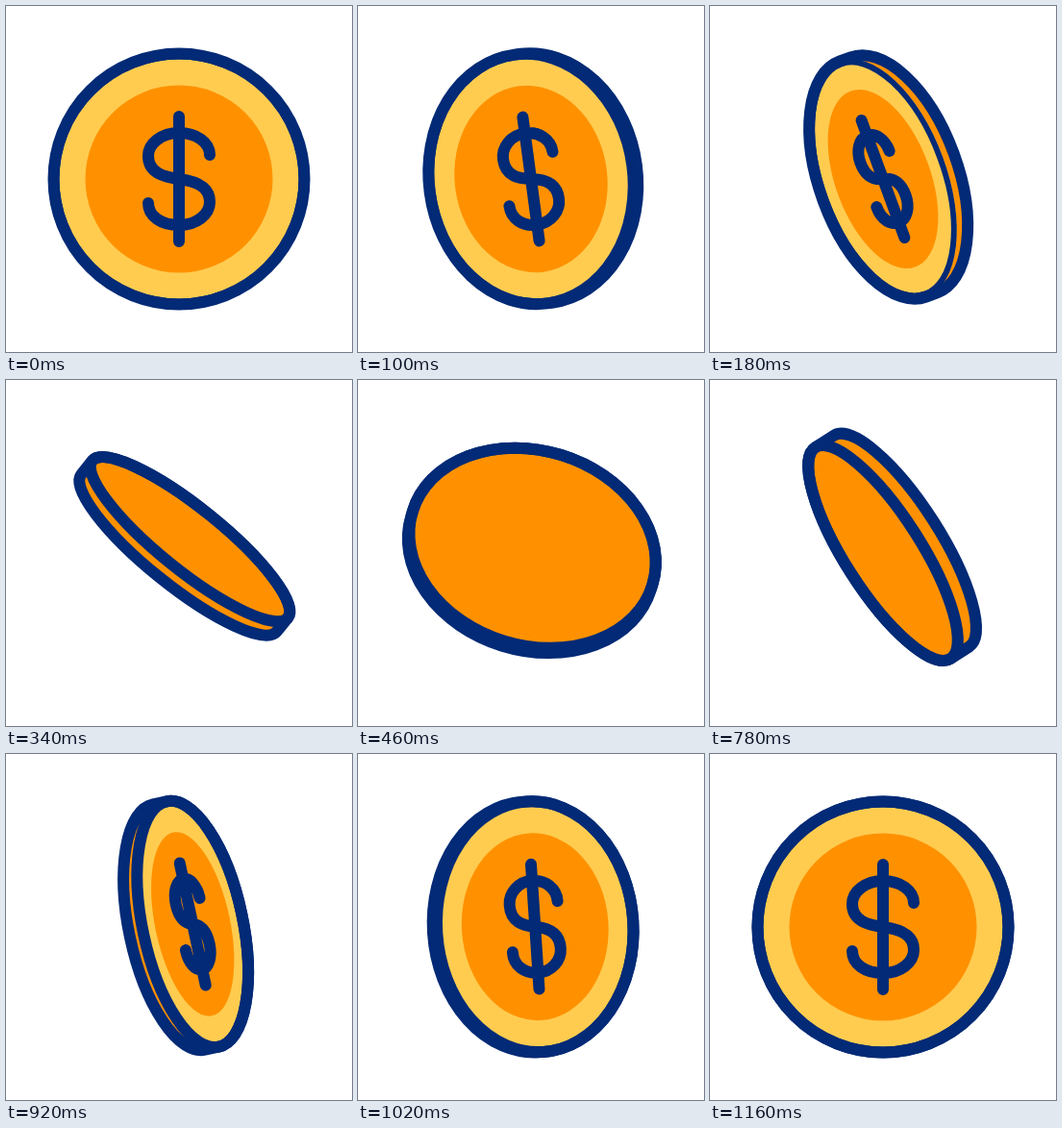
Recreate the animation shown at these times as an HTML page with a canvas. Size 360 by 360 pixels, loop 1.4 s.

```html
<!DOCTYPE html>
<html lang="en">
<head>
<meta charset="utf-8">
<title>Flipping coin</title>
<style>
  html, body { margin: 0; width: 100%; height: 100%; overflow: hidden; background: #fff; }
  canvas { display: block; width: 360px; height: 360px; }
</style>
</head>
<body>
<canvas id="stage" width="360" height="360"></canvas>
<script>
const ctx = document.getElementById('stage').getContext('2d');
const LOOP = 1400, STEP = 20, FLIP = 560, END = 1160;
const RADIUS = 130.5, DISC = 97.5, LINE = 12;
const NAVY = '#022a76', ORANGE = '#ff9100', YELLOW = '#ffcc50';

// Ease with flat ends: a Bezier curve through (x1, 0) and (x2, 1).
function ease(x, x1, x2) {
  let lo = 0, hi = 1;
  for (let i = 0; i < 24; i++) {
    const p = (lo + hi) / 2, q = 1 - p;
    if (3 * x1 * p * q * q + 3 * x2 * p * p * q + p * p * p < x) lo = p;
    else hi = p;
  }
  return lo * lo * (3 - 2 * lo);
}

// facing: 1 = front to the viewer, 0 = edge-on, -1 = back to the viewer
// depth: thickness of the edge when seen edge-on
function poseAt(time) {
  if (time < FLIP) {
    const e = ease(time / FLIP, 0.287, 0.755);
    return { facing: 1 - 2 * e, tilt: 82 * e, depth: 24.5, firstHalf: true };
  }
  const x = Math.min(1, (time - FLIP) / (END - FLIP));
  const e = ease(x, 0.305, 0.6);
  return {
    facing: 2 * e - 1,
    tilt: 60 * (1 - ease(x, 0.28, 0.43)),
    depth: 41 - 24 * e,
    firstHalf: false
  };
}

function oval(cx, squash, radius) {
  const path = new Path2D();
  path.ellipse(cx, 0, radius * squash, radius, 0, 0, 2 * Math.PI);
  return path;
}

// Outline of the two faces and the edge between them
function hull(offset, squash) {
  const path = new Path2D(), rx = RADIUS * squash;
  path.ellipse(0, 0, rx, RADIUS, 0, Math.PI / 2, Math.PI * 1.5);
  path.ellipse(offset, 0, rx, RADIUS, 0, -Math.PI / 2, Math.PI / 2);
  path.closePath();
  return path;
}

function fill(path, color) {
  ctx.fillStyle = color;
  ctx.fill(path);
}

const dollar = new Path2D(
  'M0-65V65M32-25C32-38 18-48 0-48S-32-37-32-24C-32-6-15-2 0 0' +
  'C16 2 32 7 32 24C32 37 18 48 0 48S-32 39-32 25');

function drawDollar(cx, squash) {
  const path = new Path2D();
  path.addPath(dollar, new DOMMatrix([squash, 0, 0, 1, cx, 0]));
  ctx.stroke(path);
}

function draw(time) {
  const { facing, tilt, depth, firstHalf } = poseAt(time);
  const squash = Math.max(0.001, Math.abs(facing));
  const offset = depth * (1 - Math.min(1, squash));
  const frontVisible = facing > 0;
  const near = frontVisible === firstHalf ? 0 : offset;
  const face = oval(near, squash, RADIUS);
  const outline = hull(offset, squash);

  ctx.setTransform(1, 0, 0, 1, 0, 0);
  ctx.fillStyle = '#fff';
  ctx.fillRect(0, 0, 360, 360);
  ctx.translate(180, 180);
  ctx.rotate(-tilt * Math.PI / 180);
  ctx.lineWidth = LINE;
  ctx.lineCap = ctx.lineJoin = 'round';
  ctx.strokeStyle = NAVY;

  fill(outline, ORANGE);
  fill(face, frontVisible ? YELLOW : ORANGE);
  if (frontVisible) {
    fill(oval(near, squash, DISC), ORANGE);
    drawDollar(near, squash);
  }

  // On the first turn the edge covers the outer half of the face line.
  ctx.save();
  if (frontVisible && firstHalf) ctx.clip(face);
  ctx.stroke(face);
  ctx.restore();
  ctx.stroke(outline);
}

const start = performance.now();
function tick() {
  const time = (performance.now() - start) % LOOP;
  draw(Math.floor(time / STEP) * STEP);
  requestAnimationFrame(tick);
}
tick();
</script>
</body>
</html>
```
